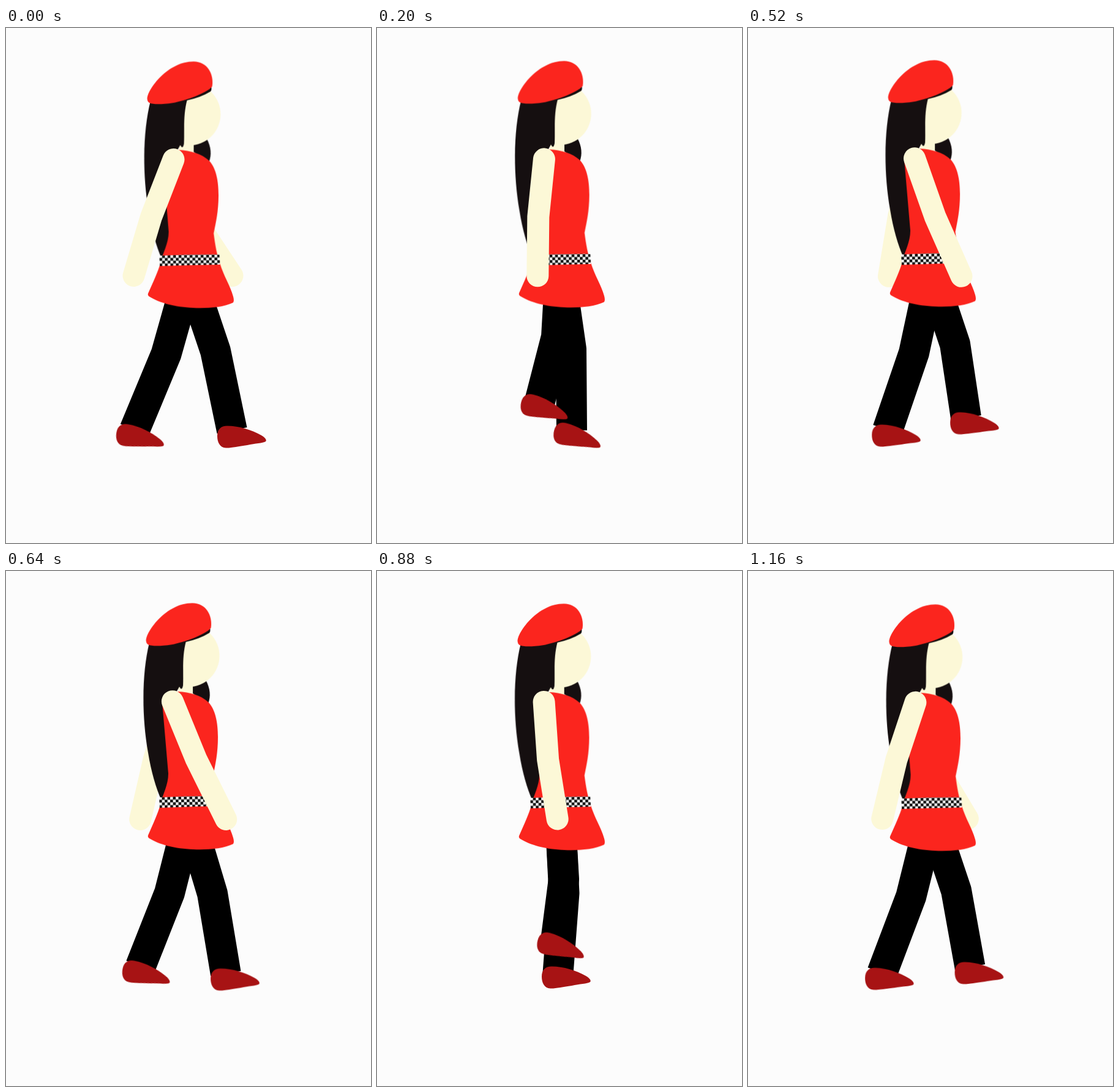
An HTML page without scripts for the animation above (1.2 s loop, 596 by 842 pixels).

```html
<!DOCTYPE html>
<html lang="en">
<head>
<meta charset="utf-8">
<title>Walk cycle</title>
<style>
  html, body { margin: 0; height: 100%; overflow: hidden; background: #fcfcfc; }
  svg { display: block; width: 100%; height: 100%; }

  .red { fill: #fb251e; }
  .skin { fill: #fcf8d7; }
  .hair { fill: #150f10; }
  .shoe { fill: #a71314; }
  .arm { fill: none; stroke: #fcf8d7; stroke-width: 36; stroke-linecap: round; stroke-linejoin: round; }
  .leg { fill: none; stroke: #000; stroke-width: 50; stroke-linejoin: round; }

  /* 30 drawings per cycle; the small lead keeps each step on its boundary */
  .body, .arm, .leg, .foot, .dip { animation: 1200ms steps(15) -1ms infinite; }
  .body { animation-name: bob; transform-origin: 300px 430px; }
  .near { animation-name: near; }
  .far { animation-name: far; }
  .leg { animation-name: leg; }
  .foot { animation-name: foot; }
  .dip { animation-name: dip; }
  .half { animation-delay: -601ms; }

  @keyframes bob {
    0%, 100% { transform: translateY(2.5px) rotate(.37deg); }
    50% { transform: translateY(0) rotate(0deg); }
  }
  @keyframes near {
    0%, 100% { d: path("M273.5 215L237 309L208.5 405"); }
    50% { d: path("M271.8 213L316 308L370 406"); }
  }
  @keyframes far {
    0%, 100% { d: path("M273.5 215L304 306L369.5 405"); }
    50% { d: path("M271.8 213L237 309L208.5 406"); }
  }
  /* first half swings forward, second half bears the weight */
  @keyframes leg {
    0% { d: path("M299 400L261.5 533L210 657"); animation-timing-function: steps(3); }
    10% { d: path("M299 400L278 513L239 625"); animation-timing-function: steps(2); }
    16.6667% { d: path("M299 400L293 505L266 610"); animation-timing-function: steps(2); }
    23.3333% { d: path("M299 400L305 504L292 605"); animation-timing-function: steps(2); }
    30% { d: path("M299 400L318 503L316 610"); animation-timing-function: steps(4); }
    43.3333% { d: path("M299 400L338 517L356 637"); animation-timing-function: steps(2); }
    50% { d: path("M299 400L342 528L369 658"); animation-timing-function: steps(5); }
    66.6667% { d: path("M299 400L317 525L318 658"); animation-timing-function: steps(8); }
    93.3333% { d: path("M299 400L271 531L228 657"); animation-timing-function: steps(2); }
    100% { d: path("M299 400L261.5 533L210 657"); }
  }
  @keyframes foot {
    0% { transform: translate(205.5px, 656.5px) rotate(9.5deg); animation-timing-function: steps(3); }
    10% { transform: translate(236px, 625px) rotate(13deg); animation-timing-function: steps(2); }
    16.6667% { transform: translate(261px, 608.5px) rotate(14deg); animation-timing-function: steps(2); }
    23.3333% { transform: translate(288px, 601px) rotate(15deg); animation-timing-function: steps(2); }
    30% { transform: translate(313.5px, 607px) rotate(11deg); animation-timing-function: steps(4); }
    43.3333% { transform: translate(354.5px, 636px) rotate(2deg); animation-timing-function: steps(2); }
    50% { transform: translate(369px, 658px) rotate(0deg); animation-timing-function: steps(7); }
    73.3333% { transform: translate(293px, 654px) rotate(0deg); animation-timing-function: steps(7); }
    96.6667% { transform: translate(215.5px, 656.5px) rotate(2deg); animation-timing-function: steps(1); }
    100% { transform: translate(205.5px, 656.5px) rotate(9.5deg); }
  }
  @keyframes dip {
    0% { transform: rotate(0deg); animation-timing-function: steps(5); }
    16.6667% { transform: rotate(14deg); animation-timing-function: steps(4); }
    30% { transform: rotate(11deg); animation-timing-function: steps(4); }
    43.3333%, 100% { transform: rotate(0deg); }
  }
</style>
</head>
<body>
<svg viewBox="0 0 596 842">
  <defs>
    <path id="shoe" class="shoe" d="M-24 9C-24-2-18-7.500-8-7.500C12-7.500 32-1 48 8C55 12 57 16 55 18C50 21 38 21 25 24C10 26-2 29-10 28.500C-20 28-24 19-24 9z"/>
    <pattern id="check" width="9" height="9" patternUnits="userSpaceOnUse" patternTransform="translate(250 369.5) rotate(-1)">
      <path fill="#fff" d="M0 0h9v9h-9z"/>
      <path d="M4.500 0h4.500v4.500h-9v4.500h4.500z"/>
    </pattern>
  </defs>

  <path class="arm far" d="M273.5 215L304 306L369.5 405"/>

  <path class="leg half" d="M299 400L342 528L369 658"/>
  <path class="leg" d="M299 400L261.5 533L210 657"/>
  <g class="foot half"><g class="dip"><use href="#shoe"/></g></g>
  <g class="foot"><use href="#shoe"/></g>

  <g class="body">
    <path class="hair" d="M305 170L326 178Q337 198 330 217L305 200z"/>
    <path class="skin" d="M281 175h24v30h-24z"/>
    <circle class="skin" cx="297.5" cy="138.5" r="51"/>
    <path class="hair" d="M234 117C222 165 221 235 232 297C237 328 245 355 253.500 374L275 330L278 198L283 189Q287 197 289 187C290 165 287 140 294 114z"/>
    <path class="hair" d="M292 110L332 90Q335 97 332 101Q316 111 293 116z"/>
    <path class="red" d="M228.500 113C229 98 262 52.300 304 52.300C326 52.300 337.500 72 334.500 93C325 104 292 116 270 120.300C252 123 238 123 232 120.300Q228.500 118 228.500 113z"/>
    <path class="red" d="M281 197C300 198 318 203 330 214C342 226 346 248 346 271C346 298 342 315 338.500 333C341 352 344 368 349 382C355 402 366 418 371 436Q373 443 371 446C355 454 328 456 306 455C276 454 250 447 234 437Q231 435 232 432C240 414 248 396 252 382C256 364 265 350 265 331L255 215Q262 197 281 197z"/>
    <path fill="url(#check)" d="M250 370Q300 367 348 367.500L349 384Q300 385 251 387z"/>
  </g>

  <path class="arm near" d="M273.5 215L237 309L208.5 405"/>
</svg>
</body>
</html>
```
